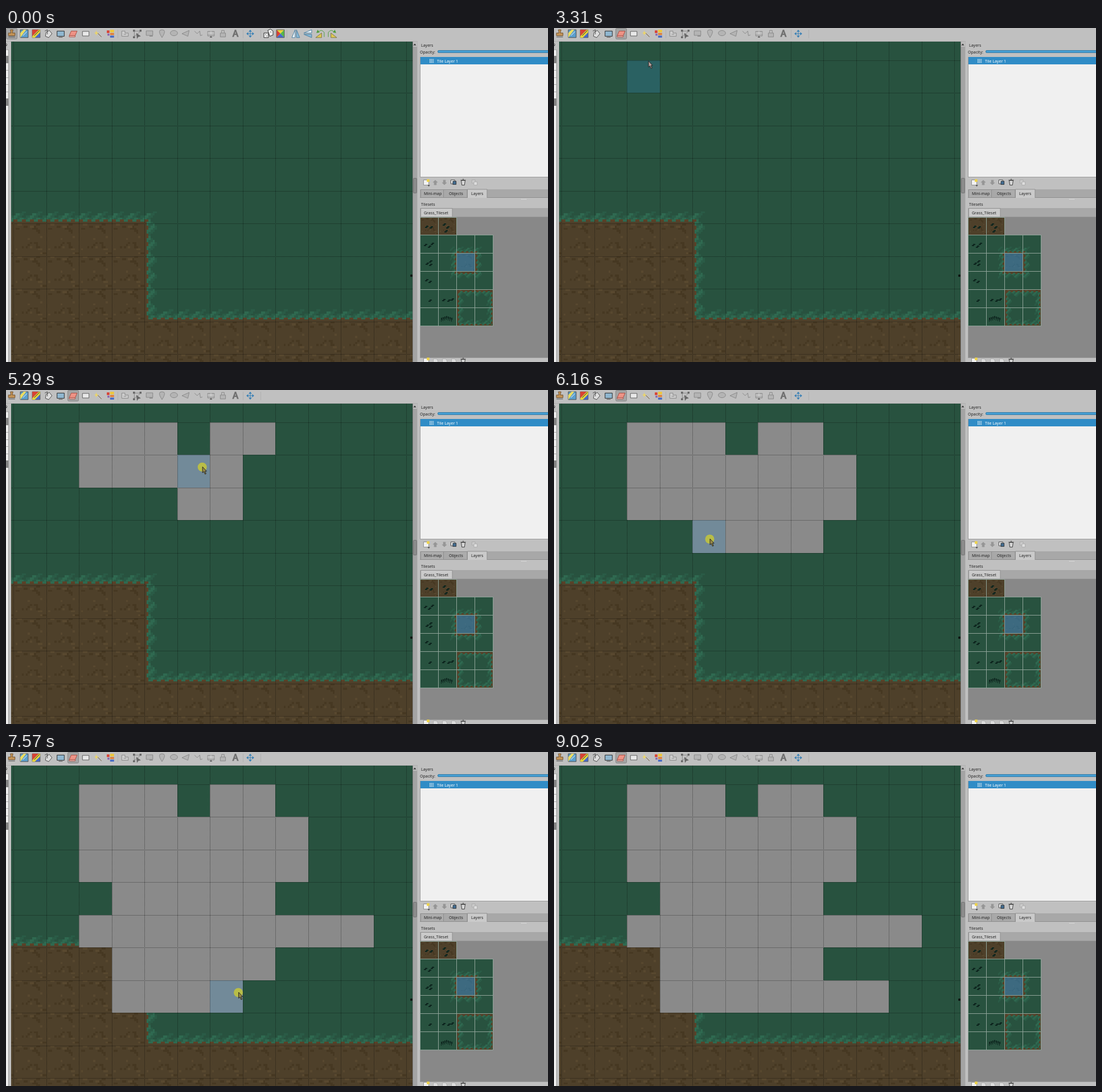
These frames come from a looping animation (952 px wide and 588 px high, 9590 ms). An HTML page:

```html
<!DOCTYPE html>
<html lang="en">
<head>
<meta charset="utf-8">
<title>Tile map editor</title>
<style>
html, body { margin: 0; width: 100%; height: 100%; overflow: hidden; background: #c0c0c0; }
svg { display: block; width: 100vw; height: 100vh; }
text { font: 7px "Noto Sans", "Open Sans", sans-serif; fill: #222; }
.px { shape-rendering: crispEdges; }
</style>
</head>
<body>
<svg viewBox="0 0 952 588" xmlns="http://www.w3.org/2000/svg">
  <defs>
    <clipPath id="mapClip"><rect x="9" y="24" width="705" height="564"/></clipPath>
    <g id="tiles"></g>
  </defs>
  <rect width="952" height="588" fill="#c0c0c0"/>

  <g id="leftStrip" class="px">
    <path d="M0 38h4v550h-4z" fill="#eee"/>
    <path d="M0 49h4v13h-4zM0 124h4v13h-4z" fill="#858585"/>
    <path d="M0 38h4M0 74h4M0 87h4M0 99h4M0 112h4" stroke="#aaa"/>
    <path d="M4.5 38v550" stroke="#999"/>
    <path d="M0 27l2 2-2 3" fill="none" stroke="#555"/>
  </g>

  <g clip-path="url(#mapClip)">
    <rect x="9" y="24" width="705" height="564" fill="#28523f"/>
    <g id="map" class="px"></g>
    <path id="holes" class="px" fill="#8a8a8a"/>
    <g id="hover" class="px">
      <use id="stamp" href="#t-" opacity=".95"/>
      <rect id="tint" width="57.5" height="57.5" fill="#308cc6"/>
    </g>
    <path id="grid" class="px" fill="none" stroke="#000" stroke-opacity=".5" stroke-dasharray="1 1"/>
  </g>
  <rect x="710" y="434" width="4" height="4" rx="1" fill="#101814"/>

  <g id="scrollbar">
    <rect x="714" y="24" width="9" height="564" fill="#a4a4a4"/>
    <path d="M714.5 24v564" stroke="#7c7c7c"/>
    <path d="M722.5 24v564" stroke="#b4b4b4"/>
    <rect x="715" y="24" width="7" height="9" fill="#bcbcbc"/>
    <path d="M715.5 30.5l2.5-3 2.5 3z" fill="#333"/>
    <rect x="715.5" y="264.5" width="6" height="26" rx="1" fill="#8c8c8c" stroke="#747474"/>
  </g>

  <g id="layers">
    <text x="729" y="33">Layers</text>
    <text x="727" y="44.5">Opacity:</text>
    <rect x="758.5" y="39.5" width="200" height="4" rx="1.5" fill="#469ed2" stroke="#28709e" stroke-width=".8"/>
    <rect x="727.5" y="51.5" width="230" height="211" fill="#f0f0f0" stroke="#999"/>
    <rect x="728" y="51" width="224" height="13" fill="#308cc6"/>
    <path d="M744 55.5h8M744 58h8M744 60.5h8" stroke="#fff" stroke-width="1.4" stroke-dasharray="1.4 1.2"/>
    <text x="757" y="60.5" style="fill:#fff">Tile Layer 1</text>
    <g id="layerTools"></g>
    <g stroke="#8e8e8e">
      <rect x="727" y="284" width="225" height="14" fill="#a8a8a8" stroke="none"/>
      <path d="M728.5 298v-13.500h40v13.500M768.500 284.500h41.500v13.500" fill="#acacac"/>
      <path d="M727 298.500h225"/>
      <path d="M810.500 299v-15h34.500v15" fill="#cacaca"/>
    </g>
    <text x="734" y="294">Mini-map</text>
    <text x="778" y="294">Objects</text>
    <text x="817" y="294">Layers</text>
    <path d="M905 301.500h10" stroke="#eee" stroke-dasharray="1 1"/>
  </g>

  <g id="tilesets">
    <text x="729" y="312.500">Tilesets</text>
    <rect x="727" y="317" width="225" height="16" fill="#a8a8a8"/>
    <path d="M728.500 333v-15.500h55.500v15.500" fill="#cacaca" stroke="#8e8e8e"/>
    <text x="734" y="327.500">Grass_Tileset</text>
    <rect x="727.500" y="332.500" width="230" height="248" fill="#888" stroke="#999"/>
    <g id="palette" class="px"></g>
    <path id="sprigs" class="px" fill="#0d251e"/>
    <rect x="792" y="397" width="32" height="32" fill="#308cc6" opacity=".55"/>
    <path id="paletteGrid" class="px" fill="none" stroke="#8fa499"/>
    <rect x="723" y="581" width="229" height="7" fill="#c0c0c0"/>
    <g id="tilesetTools"></g>
  </g>

  <g id="toolbar">
    <rect width="952" height="24" fill="#c0c0c0"/>
    <path d="M0 23.500h723" stroke="#b0b0b0"/>
    <path d="M196.500 3v15M416.500 3v15M447.500 3v15" stroke="#b0b0b0"/>
    <rect id="hot" x="108.500" y=".5" width="19" height="19" rx="2" fill="#d2d2d2" stroke="#999"/>
    <rect id="active" y=".5" width="19" height="19" rx="2" fill="#a4a4a4" stroke="#858585"/>
    <g id="icons"></g>
    <g id="stampIcons"></g>
  </g>

  <g id="pointer">
    <circle id="press" cx="-.5" cy=".5" r="8" fill="#bcc043" opacity=".95"/>
    <path id="arrow" d="M0 0V10.500L2.400 8.400 4.400 13 6.200 12.200 4.300 7.800H7.200Z" stroke="#1c1c1c" stroke-width=".9"/>
  </g>
</svg>

<script>
const $ = id => document.getElementById(id);
const LOOP = 9590, CELL = 57.5, X0 = 13.2, Y0 = 56.9;
const ERASER_ON = 2900, ERASE_FROM = 3400, ERASE_TO = 8050;

// ---------- pixel tiles (16 x 16) ----------
let seed = 11;
const rnd = n => (seed = (seed * 16807) % 2147483647) % n;
const specks = {};
for (let i = 0; i < 26; i++) {
  const x = rnd(16), y = rnd(16), tone = i % 3 ? '#463822' : '#58482f';
  specks[x + ',' + y] = tone;
  if (i % 2) specks[(x + 1) % 16 + ',' + y] = tone;
}

const depth = { T: (x, y) => y, B: (x, y) => 15 - y, L: x => x, R: x => 15 - x };

function shade(x, y, v) {
  const k = (x + y) % 4;
  if (v < (k < 2 ? 1 : 2)) return v === 1 ? '#5a4128' : specks[x + ',' + y] || '#4e402a';
  if (v < 2.5 + (x + y) % 8 / 2) return k < 2 ? '#2f6950' : '#2a5b46';
}

// Upper case: dirt along every named side. Lower case: dirt only in their shared corner.
function makeTile(kind) {
  const up = kind.toUpperCase(), mix = kind === up ? Math.min : Math.max, paths = {};
  for (let y = 0; y < 16; y++) for (let x = 0; x < 16; x++) {
    const v = kind ? mix(...[...up].map(s => depth[s](x, y))) : -1;
    const tone = shade(x, y, v);
    if (tone) paths[tone] = (paths[tone] || '') + `M${x} ${y}h1v1h-1z`;
  }
  const body = Object.entries(paths).map(([c, d]) => `<path fill="${c}" d="${d}"/>`).join('');
  return `<g id="t-${kind}">${body}</g>`;
}
const kinds = ['', ...'T B L R LB LT RB RT lb lt rb rt'.split(' ')];
$('tiles').innerHTML = kinds.map(makeTile).join('');

const place = (kind, x, y, size) =>
  `<use href="#t-${kind}" transform="translate(${x} ${y}) scale(${size / 16})"/>`;

// ---------- map ----------
function kindAt(c, r) {
  if (c < 4) return r < 4 ? null : r === 4 ? 'B' : '';
  if (r > 7) return '';
  if (c === 4) return r < 4 ? null : r === 4 ? 'lb' : r < 7 ? 'L' : 'LB';
  return r === 7 ? 'B' : null;
}
const cx = c => X0 + c * CELL, cy = r => Y0 + r * CELL;
let mapHtml = '', gridPath = '';
for (let c = -1; c < 13; c++) {
  gridPath += `M${Math.round(cx(c)) + .5} 24V588`;
  for (let r = -1; r < 10; r++) {
    const kind = kindAt(c, r);
    if (kind !== null) mapHtml += place(kind, cx(c), cy(r), CELL);
  }
}
for (let r = 0; r < 10; r++) gridPath += `M9 ${Math.round(cy(r)) + .5}H714`;
$('map').innerHTML = mapHtml;
$('grid').setAttribute('d', gridPath);

// ---------- tileset palette ----------
const px = c => 728 + c * 32, py = r => 333 + r * 32;
let pal = '<path fill="#28523f" d="M728 365h128v160h-128z"/>';
pal += place('', px(0), py(0), 32) + place('', px(1), py(0), 32);
[['rb', 'B', 'lb'], ['R', '', 'L'], ['rt', 'T', 'lt']].forEach((row, r) =>
  row.forEach((kind, c) => pal += place(kind, px(c + 1), py(r + 1), 32)));
[['LT', 'RT'], ['LB', 'RB']].forEach((row, r) =>
  row.forEach((kind, c) => pal += place(kind, px(c + 2), py(r + 4), 32)));
$('palette').innerHTML = pal;

let lines = 'M728 333.500h64';
for (let r = 1; r < 7; r++) lines += `M728 ${py(r) - .5}h128`;
for (let c = 0; c < 5; c++) lines += `M${px(c) - .5} ${c < 3 ? 333 : 365}V525`;
$('paletteGrid').setAttribute('d', lines);

const sprigs = [[736, 348], [744, 349], [767, 344], [773, 349], [770, 356], [734, 380], [746, 378],
  [741, 383], [737, 413], [743, 409], [743, 415], [736, 442], [742, 445], [742, 478], [766, 477],
  [775, 478], [781, 476]];
let sprigPath = sprigs.map(([x, y]) => `M${x} ${y + 2}h2v-2h4v2h-2v2h-4z`).join('');
for (let i = 0; i < 7; i++)
  sprigPath += `M${764 + i * 3} ${507 + Math.abs(i - 3)}h2v4h-1v3h-1z`;
$('sprigs').setAttribute('d', sprigPath);

// ---------- icons, drawn around their centre ----------
const icon = (x, y, ...parts) => `<g transform="translate(${x} ${y}) scale(1.15)">` +
  parts.map(([d, fill = 'none', stroke = 'none']) =>
    `<path d="${d}" fill="${fill}" stroke="${stroke}" stroke-width=".8"/>`).join('') + '</g>';
const box = (w, h) => `M${-w / 2} ${-h / 2}h${w}v${h}h${-w}z`;
const ring = (a, b) => `M${-a} 0a${a} ${b} 0 1 0 ${2 * a} 0a${a} ${b} 0 1 0 ${-2 * a} 0`;
const ink = '#444', dim = '#858585', pale = '#b4b4b4';

const swatch = [
  ['M-6 -6H6L0 0z', '#e7d43a'], ['M-6 -6V6L0 0z', '#d84234'],
  ['M6 -6V6L0 0z', '#56b848'], ['M-6 6H6L0 0z', '#4668cf'], [box(12, 12), 'none', '#555']];
const shape = d => [d, pale, dim];

$('icons').innerHTML = [
  icon(10, 10, ['M-2 -6h4l-1 5h4v4h-10v-4h4z', '#c59558', '#6a4a26'], ['M-5 5h10', 'none', ink]),
  icon(32, 10, [box(12, 12), '#5b9ecc', ink], ['M-6 6V-1L-1 -6H3z', '#eadb62'], ['M-2 3L4 -3', 'none', '#fff']),
  icon(53, 10, [box(12, 12), '#4668cf', '#555'], ['M-6 -6H4L-6 4z', '#d84234'],
    ['M6 -6V-2L-2 6H-6V4L4 -6z', '#e7d43a'], ['M-3 3L5 -5', 'none', '#222']),
  icon(75, 10, ['M-4 -2l5 -3 4 5 -5 6 -5 -2z', '#ddd', ink], ['M-6 -4l4 -2v7', 'none', ink]),
  icon(96, 10, [box(11, 8), '#8fb6cf', '#222'], ['M-3 5.500h6', 'none', ink]),
  icon(118, 10, ['M-6 3l3 -7h9l-3 7z', '#ee9386', '#a5473c'], ['M-6 3h9v2h-9z', '#f6c1b8', '#a5473c']),
  icon(140, 10, [box(10, 7), '#e8e8e8', '#555']),
  icon(162, 10, ['M-1 -1L5 5', 'none', '#6b502e'], ['M-3 -5l1 3 3 1 -3 1 -1 3 -1 -3 -2 -1 2 -1z', '#ecd567']),
  icon(184, 10, ['M-6 -5h4v4h-4z', '#d84234'], ['M-1 -6h6v4h-6z', '#eec83b'], ['M-1 -1h6v3h-6z', '#e37d36'],
    ['M-1 3h6v3h-6z', '#4669c4'], ['M-5 0h3v3h-3z', '#8a64af']),
  icon(209, 10, ['M-5 -4h5v3h5v5h-10z', '#ccc', dim], ['M-2 1h4', 'none', dim]),
  icon(230, 10, ['M-5 -4L5 -4M-4 -4V5M-4 4L5 -3', 'none', dim], ['M-1 -1l7 5 -4 1 -2 3z', '#666'],
    ['M-6 -6h3v3h-3zM4 -6h3v3h-3zM-6 4h3v3h-3z', '#666']),
  icon(252, 9, shape(box(10, 7)), ['M0 4.500h5', 'none', '#666']),
  icon(274, 10, shape('M0 6Q-8 -6 0 -6T0 6z')),
  icon(295, 9, shape(ring(5.500, 4))),
  icon(316, 10, shape('M-6 0L5 -5 3 4z')),
  icon(338, 10, ['M-6 -4L-2 0 2 -4 3 3 6 2', 'none', dim]),
  icon(360, 10, shape(box(10, 7)), ['M-5 -1h10M0 -4v5', 'none', '#ddd'], ['M-2 6L0 3l2 3z', '#666']),
  icon(381, 10, shape('M-4 -1h8v6h-8z'), ['M-2 -1v-4h4v4', 'none', dim]),
  icon(403, 10, ['M-5 5L-1 -6H1L5 5H2.500L1.500 2H-1.500L-2.500 5zM-.8 0H.8L0 -3z', '#707070']),
  icon(429, 10, ['M-4 0H4M0 -4V4', 'none', '#347eb5'],
    ['M0 -6l2.500 3h-5zM0 6l2.500 -3h-5zM-6 0l3 -2.500v5zM6 0l-3 -2.500v5z', '#347eb5'])
].join('');

const arc = d => [d, 'none', '#4b9b3b'];
const dots = 'M-1 1h1v1h-1zM-5 1h1v1h-1zM-3 3h1v1h-1zM3 -3h1v1h-1z';
$('stampIcons').innerHTML = [
  icon(461, 10, ['M-7 -1h7v7h-7z', '#eee', '#222'], ['M-1 -5l4 -2 4 3v6l-5 2z', '#eee', '#222'], [dots, '#222']),
  icon(482, 10, ...swatch),
  '<path d="M493.500 3v15" stroke="#b0b0b0"/>',
  icon(509, 10, ['M-1 -6V6H-6z', '#e9f1f6', '#42799d'], ['M1 -6V6H6z', '#8bbad8', '#42799d']),
  icon(530, 10, ['M-6 -1H6V-6z', '#e9f1f6', '#42799d'], ['M-6 1H6V6z', '#8bbad8', '#42799d']),
  icon(552, 10, ['M-7 6L2 6 2 -1z', '#dfc953', '#777043'], arc('M-3 -2Q1 -8 6 -2V5'), ['M-6 -1l2 -5 3 4z', '#4b9b3b']),
  icon(573, 10, ['M7 6L-2 6 -2 -1z', '#dfc953', '#777043'], arc('M3 -2Q-1 -8 -6 -2V5'), ['M6 -1l-2 -5 -3 4z', '#4b9b3b'])
].join('');

const page = (x, y) => icon(x, y, ['M-4 -4h6l2 2v6h-8z', '#f2f2f2', '#888'], ['M1 -5h4v4h-4z', '#edd24a'], ['M2 4h4l-2 2z', ink]);
const bin = (x, y) => icon(x, y, ['M-3 -3h6l-1 7h-4z', '#d8d8d8', '#333'], ['M-4 -3.500h8M-1 -5h2', 'none', '#333']);
const sheet = (x, y) => icon(x, y, ['M-3 -4h5l2 3v6h-7z', '#ddd', '#aaa']);
$('layerTools').innerHTML = page(738, 272) +
  icon(754, 272, ['M0 -4l4 4h-2v4h-4v-4h-2z', '#969696']) +
  icon(770, 272, ['M0 4l4 -4h-2v-4h-4v4h-2z', '#969696']) +
  icon(786, 272, ['M-4 -4h6v6h-6z', '#eee', '#444'], ['M-1 -2h5v5h-5z', '#436d91', '#333']) + bin(803, 272) +
  icon(823, 272, ['M-4 -4h5v5h-5z', '#ccc', '#aaa'], ['M-1 -1h5v5h-5z', '#ddd', '#aaa']);
$('tilesetTools').innerHTML = page(738, 586) + [754, 770, 786].map(x => sheet(x, 587)).join('') + bin(803, 587);

// ---------- pointer path: time, x, y ----------
const keys = [
  [440, 860, 545], [700, 640, 400], [1100, 300, 165], [1250, 259, 129], [1370, 212, 84],
  [1700, 150, 32], [2000, 110, 4], [2410, 110, 4], [2640, 117, 8], [3150, 117, 8],
  [3310, 166, 58], [3450, 158, 85], [3600, 160, 140], [3760, 215, 145], [3900, 215, 90],
  [4110, 235, 84], [4370, 272, 140], [4500, 330, 145], [4600, 330, 195], [4720, 385, 195],
  [4940, 390, 90], [5060, 440, 85], [5140, 440, 88], [5210, 385, 112], [5290, 346, 135],
  [5370, 215, 150], [5440, 160, 200], [5680, 385, 200], [5800, 490, 150], [5900, 500, 200],
  [5980, 445, 215], [6040, 440, 258], [6160, 275, 262], [6240, 212, 262], [6300, 208, 312],
  [6370, 158, 316], [6680, 618, 318], [6850, 445, 322], [6910, 440, 372], [7080, 215, 375],
  [7170, 212, 425], [7570, 408, 423], [7760, 550, 428], [8000, 560, 430], [8400, 340, 205],
  [8550, 400, 250], [8980, 913, 579]];

const slope = (i, a) => keys[i + 1] && keys[i] ? (keys[i + 1][a] - keys[i][a]) / (keys[i + 1][0] - keys[i][0]) : 0;
function tangent(i, a) {
  const p = slope(i - 1, a), q = slope(i, a);
  return p * q > 0 ? 2 * p * q / (p + q) : 0;
}
// Monotone cubic, so the pointer never overshoots a key.
function pointerAt(t) {
  let i = 0;
  while (i < keys.length - 2 && keys[i + 1][0] <= t) i++;
  const h = keys[i + 1][0] - keys[i][0];
  const s = Math.min(1, Math.max(0, (t - keys[i][0]) / h)), e = s * s * (3 - 2 * s);
  return [1, 2].map(a => keys[i][a] + (keys[i + 1][a] - keys[i][a]) * e +
    h * s * (1 - s) * ((1 - s) * tangent(i, a) - s * tangent(i + 1, a)));
}
const cellAt = (x, y) => [Math.floor((x - X0) / CELL), Math.floor((y - Y0) / CELL)];

const erased = new Map();
for (let t = ERASE_FROM; t < ERASE_TO; t += 4) {
  const key = cellAt(...pointerAt(t)).join();
  if (!erased.has(key)) erased.set(key, t);
}

const show = (id, on) => $(id).setAttribute('visibility', on ? 'inherit' : 'hidden');

function draw(t) {
  const [x, y] = pointerAt(t), [c, r] = cellAt(x, y);
  const visible = t >= 440 && t < 9020, erasing = t >= ERASER_ON;
  const overMap = visible && x > 9 && x < 714 && y > 24;
  const pressed = t >= 2860 && t < 2950 || t >= ERASE_FROM && t < ERASE_TO;

  let d = '';
  for (const [key, at] of erased) if (at <= t) {
    const [ec, er] = key.split(',');
    d += `M${cx(+ec)} ${cy(+er)}h${CELL}v${CELL}h${-CELL}z`;
  }
  $('holes').setAttribute('d', d);

  show('hover', overMap);
  show('stamp', overMap && !erasing);
  $('hover').setAttribute('transform', `translate(${cx(c)} ${cy(r)})`);
  $('tint').setAttribute('opacity', erasing ? .26 : .33);

  show('hot', visible && !erasing && x > 108 && x < 128 && y < 20);
  $('active').setAttribute('x', erasing ? 108.5 : .5);
  show('stampIcons', !erasing);

  show('pointer', visible);
  $('pointer').setAttribute('transform', `translate(${x.toFixed(1)} ${y.toFixed(1)})`);
  show('press', visible && pressed);
  $('arrow').setAttribute('fill', pressed ? '#98894a' : '#b8a09b');
}

$('stamp').setAttribute('transform', `scale(${CELL / 16})`);
const frame = () => {
  draw(performance.now() % LOOP);
  requestAnimationFrame(frame);
};
frame();
</script>
</body>
</html>
```
